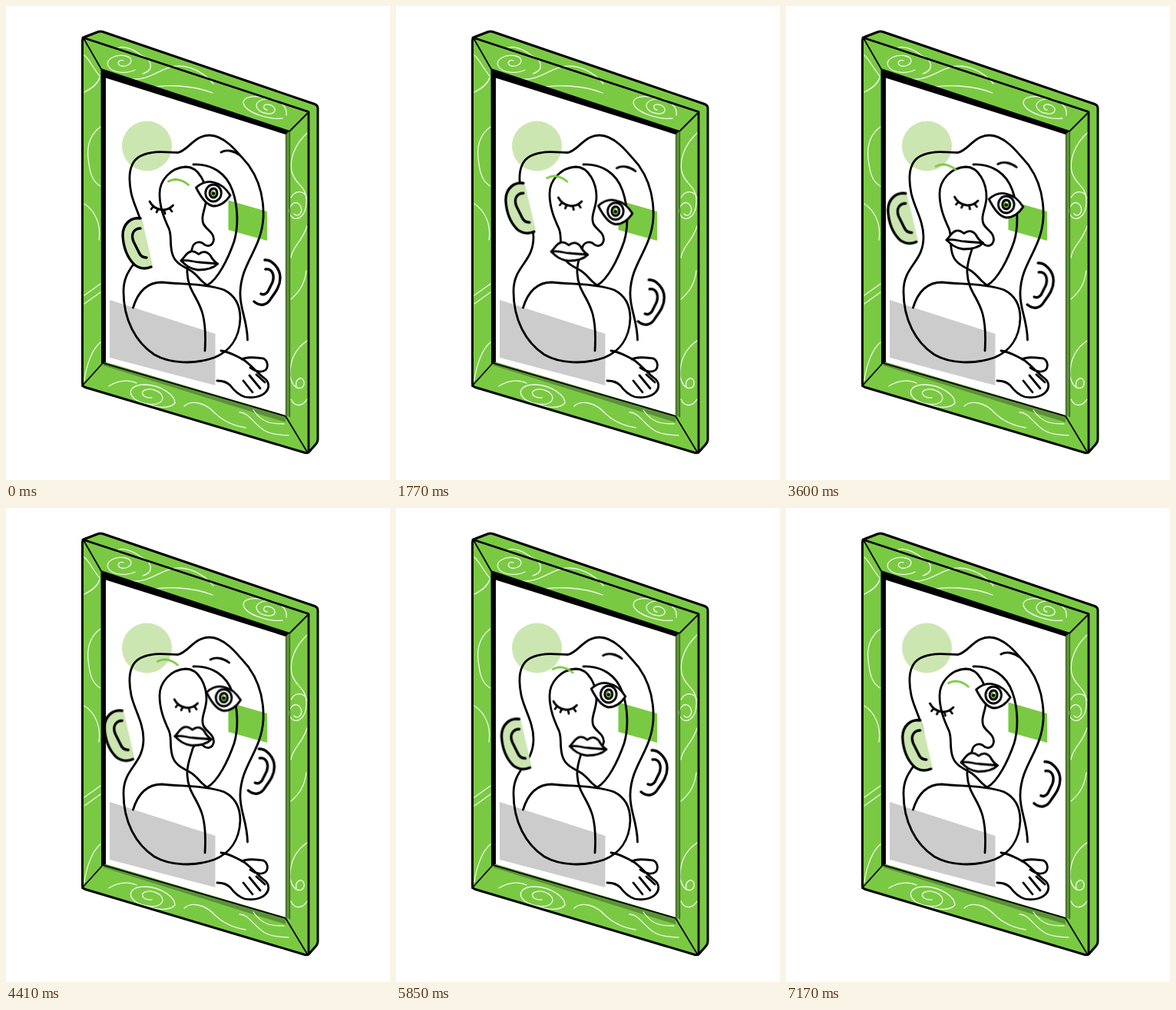
These frames come from a looping animation (500 px wide and 616 px high, 7200 ms). An HTML page:

```html
<!DOCTYPE html>
<html lang="en">
<head>
<meta charset="utf-8">
<title>Line portrait</title>
<style>
  html, body { margin: 0; width: 100%; height: 100%; overflow: hidden; background: #fff; }
  svg { display: block; width: 500px; height: 616px; }
  path, ellipse { fill: none; stroke: #000; stroke-width: 2.8; stroke-linecap: round; stroke-linejoin: round; }
  .flat { stroke: none; }
  .green { fill: #7ac943; }
  .pale { fill: #cce6b2; }
  .white { fill: #fff; }
  .swirl path { stroke: #f1fae9; stroke-width: 1.3; }
  .bold path { stroke-width: 3.4; }
  .thin { stroke-width: 1.8; }

  /* Each feature drifts in straight lines between three places. */
  .part { animation: drift 7.2s linear infinite; }
  @keyframes drift {
    0%, 100% { transform: translate(0, 0); }
    33.3333% { transform: translate(var(--x1), var(--y1)); }
    66.6667% { transform: translate(var(--x2), var(--y2)); }
  }
  #ear-l  { --x1: -12.5px; --y1: -62px; --x2: -26px;   --y2: -3px; }
  #ear-r  { --x1: -10.5px; --y1: 35px;  --x2: -7px;    --y2: -27px; }
  #eye-l  { --x1: 33px;    --y1: -7px;  --x2: 32px;    --y2: -5px; }
  #eye-r  { --x1: 21.5px;  --y1: 32px;  --x2: 12px;    --y2: -2px; }
  #brow-l { --x1: -20px;   --y1: -6px;  --x2: -13px;   --y2: -33px; }
  #brow-r { --x1: 10px;    --y1: 28px;  --x2: -18.5px; --y2: 3px; }
  #mouth  { --x1: -35px;   --y1: -16px; --x2: -3px;    --y2: -38px; }
</style>
</head>
<body>
<svg viewBox="0 0 500 616">
  <!-- flat shapes -->
  <circle class="pale" cx="183.5" cy="182" r="32.5"/>
  <path class="flat" style="fill:#ccc" d="M135 382L272.500 426V493L135 457Z"/>
  <path class="flat green" d="M289.500 252.500L340 267V305L289.500 291Z"/>

  <!-- head and body -->
  <path d="M165.500 392C172 371 184 359 203 359C232 362 262 361 284 369C300 377 305 391 305 406C304 432 291 449 271 457C245 466 214 465 193 453C169 437 153 408 153 371C153 337 179 334 179 300C179 279 167 262 163 243C159 223 160 203 175 195C191 187 207 190 224 190.500C238 187 245 168 265 168C284 168 300 188 316 207C331 228 336 253 335 276C332 317 306 334 305 372C304 393 314 407 314.500 434"/>
  <path d="M244 206C268 205 287 217 295 240C302 260 303 286 297 306C289 329 276 355 262 363C253 358 250 349 239 343C230 338 219 334 216 320C213 306 216 298 212 289C206 276 200 262 200 244C200 226 215 210 234 209C251 209 261 230 261 248C261 262 253 272 257 283C261 291 271 294 270.500 304C269 313 261 313 257 309C252 305 245 307 243 313C240 324 235 335 236 347C237 370 250 378 256 400C260 415 260 432 259 448"/>

  <!-- hand -->
  <path d="M280 448C291 449 299 455 308 459C317 464 326 476 338 485C343 490 343 497 338 502C332 508 321 510 311 508C302 505 297 500 292 493C288 489 282 487 275 487M307 459C315 455 326 457 335 458C341 461 342 469 338 473C333 477 325 475 318 470M309 487L321 502M317 480L331 497M326 479L337 489"/>

  <!-- drifting features -->
  <g id="ear-l" class="part bold">
    <path class="flat pale" d="M177 277C164 273 152 283 152 298C153 317 160 329 167 336C174 342 184 342 191 337Z"/>
    <path d="M175 276C163 274 152 283 152 298C153 317 160 329 167 336C174 342 183 342 189 339M175 289C167 289 162 296 166 306L173 320C175 325 179 327 183 327"/>
  </g>
  <g id="ear-r" class="part bold">
    <path d="M337 330C346 329 357 341 357 353C357 365 350 373 345 380C340 389 331 391 323 384M338 342C347 341 350 350 347 359L341 371C339 374 335 376 332 374"/>
  </g>
  <path id="brow-l" class="part" style="stroke:#7ac943" d="M211.500 228C220 223 230 226 237.500 232.500"/>
  <path id="brow-r" class="part" d="M280 190C287 186 297 188 304.500 194"/>
  <g id="eye-l" class="part">
    <path d="M187 254C190 260 196 264 203 265C209 265 214 263 217.500 259M192 260L189 264M198 264L196 268M206 265L207 270M213 263L216 267"/>
  </g>
  <g id="eye-r" class="part">
    <path class="white" d="M247.500 236C254 230 262 227 270 229C280 231 287 238 292 246C286 255 278 260 270 260C261 259 253 247 247.500 236Z"/>
    <ellipse class="white" cx="270" cy="243" rx="10.300" ry="11"/>
    <ellipse class="green" cx="270" cy="243" rx="5" ry="6"/>
    <circle cx="270" cy="243.500" r="2.200"/>
    <circle class="white" cx="271" cy="240.500" r="1.200"/>
  </g>
  <g id="mouth" class="part">
    <path class="white" d="M228 331C232 327 235 320 241 319C246 318 248 321 251 322.500C256 318 262 319 266 324C268 328 271 332 275.500 335C270 341 261 343 250 343C240 342 234 337 228 331Z"/>
    <path d="M228 331C238 329 244 333 252 333C260 334 268 334 275.500 335"/>
  </g>

  <!-- frame -->
  <path class="flat green" d="M101 41L122 33L403 128L406 132V566L393 581L394 137Z"/>
  <path class="flat green" fill-rule="evenodd" d="M101 41L394 137L393 581L99 494V44ZM130 93V463L364 532V166Z"/>
  <path class="flat" style="fill:#5b9237" d="M364 166L369.500 163V534L364 532ZM130 463L364 532V541L126 467Z"/>

  <g class="swirl">
    <path d="M153 71C147 68 143 76 150 78C162 80 169 68 156 65C143 62 129 69 133 78C139 88 158 88 168 83M145 57C146 50 164 54 176 64C190 69 194 83 178 88"/>
    <path d="M164 95C190 97 203 77 227 78C246 79 262 91 270 101M188 107C206 101 244 103 269 113"/>
    <path d="M340 135C334 134 334 127 342 128C353 130 353 141 341 140C325 138 321 126 333 122C350 117 367 128 365 142M360 146C343 148 312 139 309 126C309 118 321 116 337 119"/>
    <path d="M102 64C109 70 112 79 122 91M102 112C112 107 119 102 122 93M123 157C108 168 104 184 108 205C110 223 117 231 123 234M102 257C116 266 124 284 121 304M102 376L123 361M102 387L123 372M123 437C112 446 105 466 102 486"/>
    <path d="M392 165C376 180 369 199 372 215C377 234 392 233 391 255C391 274 376 283 370 271C366 260 377 250 383 259C388 268 380 276 375 270M371 249C377 238 389 240 392 250M392 286C386 306 373 312 371 327M371 381C384 370 389 359 391 344M392 435C376 446 369 463 370 482C375 502 390 499 388 488C385 479 376 486 378 494M371 511C377 524 388 518 392 511"/>
    <path d="M190 509C182 510 176 506 178 501C184 494 204 500 204 510C202 521 179 519 168 511C157 502 163 492 181 492C203 493 220 506 220 516C213 524 196 522 184 517M134 494C148 485 162 486 170 490M232 520C242 511 260 516 272 529C284 541 300 546 312 548M304 528C316 528 322 543 337 552C348 558 358 557 368 558M322 525C334 543 348 543 362 543"/>
  </g>

  <path class="flat" style="fill:#000" d="M123.500 81L369.500 162L364 167L130 93.500V463L124 465Z"/>
  <path class="thin" d="M101 42L124 82M394 138L369 163M99 494L126 464L364 533L393 581"/>
  <path style="stroke:#3d5a2b;stroke-width:1.200" d="M364.500 167V532M369.500 163V534"/>
  <path d="M100 41L394 137.500V580"/>
  <path style="stroke-width:3" d="M99.500 45Q99.500 41.500 103 40L120 33.500Q123 32.500 126 33.500L402 127.500Q406 129 406 133V563Q406 567 403 570L395 579Q393 581.500 389 580.500L103 495.500Q99.500 494.500 99.500 491Z"/>
</svg>
</body>
</html>
```
